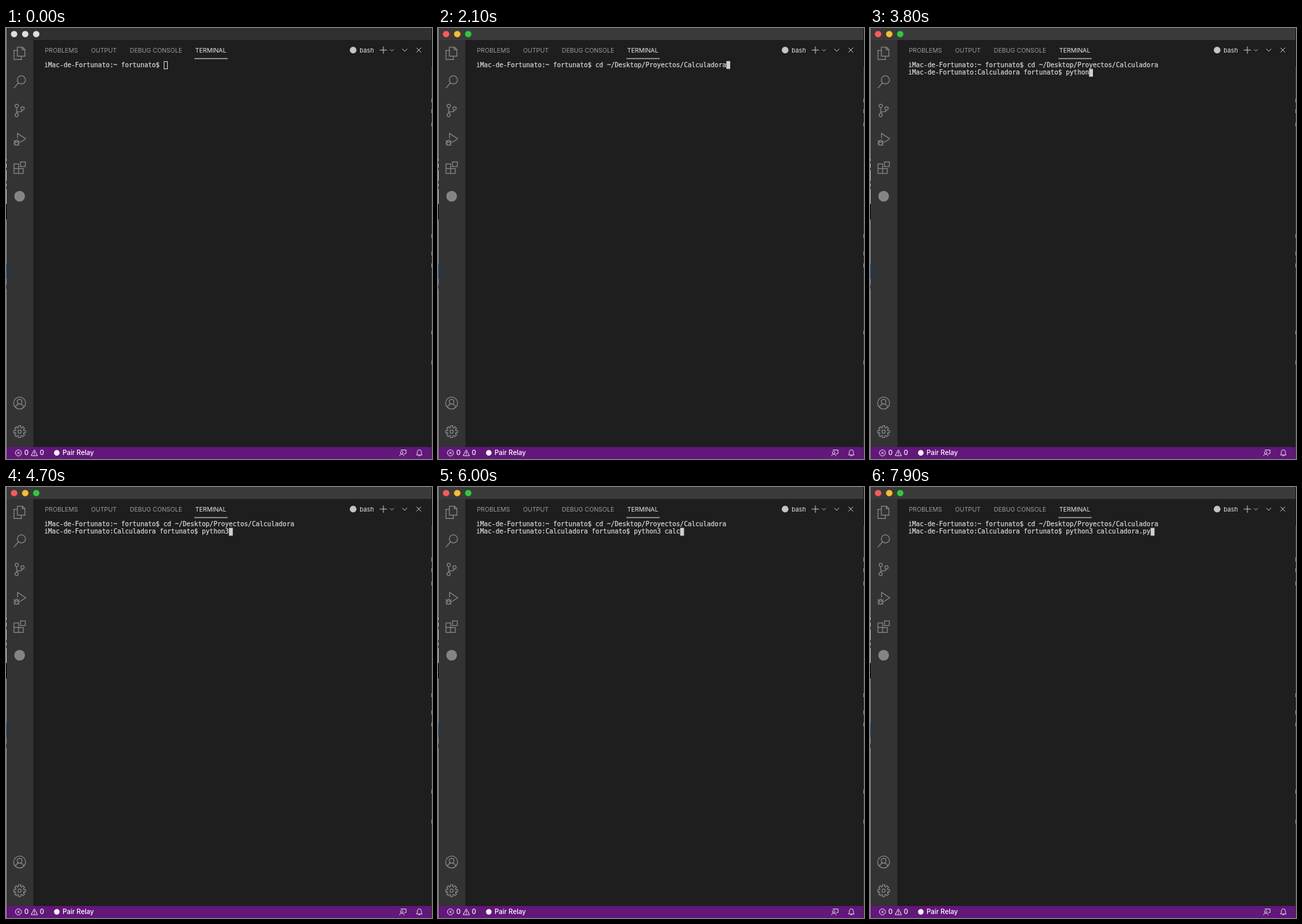
Write an HTML page with a canvas that moves like this. It is 640 px wide and 648 px high and loops after 8 s.

```html
<!DOCTYPE html>
<html lang="es">
<head>
<meta charset="utf-8">
<title>Terminal</title>
<style>
html, body { margin: 0; width: 100%; height: 100%; overflow: hidden; background: #1e1e1e; }
canvas { display: block; width: 640px; height: 648px; }
</style>
</head>
<body>
<canvas id="stage"></canvas>
<script>
const W = 640, H = 648, LOOP = 8000;
const canvas = document.getElementById('stage');
const ctx = canvas.getContext('2d');
const dpr = window.devicePixelRatio || 1;
canvas.width = W * dpr;
canvas.height = H * dpr;

const UI = 'Inter, "Open Sans", sans-serif';
const MONO = '9.6px "DejaVu Sans Mono", "Liberation Mono", monospace';
const CELL = 5.78, LINE = 11.7, LEFT = 57.5, TOP = 49.8;
const ICON = '#858585';

const PROMPT = 'iMac-de-Fortunato:';
const USER = ' fortunato$ ';
const CD = 'cd ~/Desktop/Proyectos/Calculadora';
const RUN = 'python3 calculadora.py';
const FOCUS_AT = 600, PASTE_AT = 1800, ENTER_AT = 2300;
// Moment each character of RUN is typed
const KEYS = [2900, 3200, 3350, 3500, 3650, 3800, 4300, 5000, 5400, 5600, 5750,
  5900, 6080, 6220, 6360, 6500, 6620, 6750, 6900, 7200, 7450, 7700];

function rect(x, y, w, h, color) {
  ctx.fillStyle = color;
  ctx.fillRect(x, y, w, h);
}

function disc(x, y, r, color) {
  ctx.fillStyle = color;
  ctx.beginPath();
  ctx.arc(x, y, r, 0, Math.PI * 2);
  ctx.fill();
}

function text(str, x, y, size, color, weight = 400) {
  ctx.font = `${weight} ${size}px ${UI}`;
  ctx.fillStyle = color;
  ctx.fillText(str, x, y);
}

function stroke(d, x, y, scale, color, width) {
  ctx.save();
  ctx.translate(x, y);
  ctx.scale(scale, scale);
  ctx.strokeStyle = color;
  ctx.lineWidth = width / scale;
  ctx.stroke(new Path2D(d));
  ctx.restore();
}

function ring(cx, cy, r) {
  return `M${cx + r} ${cy}a${r} ${r} 0 1 1 ${-2 * r} 0a${r} ${r} 0 1 1 ${2 * r} 0`;
}

function gear() {
  const pts = [];
  for (let i = 0; i < 8; i++) {
    const mid = i * Math.PI / 4;
    for (const [da, r] of [[-0.27, 7.7], [-0.2, 10.8], [0.2, 10.8], [0.27, 7.7]]) {
      pts.push(`${12 + r * Math.cos(mid + da)} ${12 + r * Math.sin(mid + da)}`);
    }
  }
  return 'M' + pts.join('L') + 'Z' + ring(12, 12, 3);
}

// Side bar icons on a 24 unit grid, keyed by their centre height
const sideIcons = [
  [38, 'M8 1H17.2L21.6 5.4V17.2H8ZM16.8 1V5.6H21.6M8 6.8H1.8V23.2H15.2V17.2'],
  [81, ring(15.2, 8.4, 7.4) + 'M10 13.9L1.6 23.4'],
  [124, ring(6.8, 3.7, 3) + ring(6.8, 20.2, 3) + ring(17.3, 8.2, 3) +
    'M6.8 6.7V17.2M17.2 11.2C16.6 13.5 15.5 14.2 13.5 14.2H10.5C8.5 14.2 7.2 15.5 6.9 17.2'],
  [167, 'M8.3 10.5V1.7L23 11.4L13 18' +
    'M3.4 17.5H9.8V19.5C9.8 24.4 3.4 24.4 3.4 19.5ZM4.2 17.3C4.2 12.8 9 12.8 9 17.3' +
    'M3.4 17L1.3 14.8M9.8 17L11.9 14.8M3.4 19.6H.8M9.8 19.6H12.4M3.8 21.5L1.5 23.7M9.4 21.5L11.7 23.7'],
  [210, 'M1.8 5.2H10.2V22.3H1.8ZM1.8 13.7H18.6V22.3H10.2M13.6 1.6H22.3V10.2H13.6Z'],
  [564, ring(12, 12, 10.8) + ring(12, 9.4, 4.2) + 'M4.8 20C5.5 11.6 18.5 11.6 19.2 20'],
  [607, gear()]
];

function drawTitle(focused) {
  rect(1, 0, 638, 18, focused ? '#3a3a3a' : '#303030');
  const colors = focused ? ['#fc5b57', '#fdbc2e', '#30c840'] : ['#dedede', '#dedede', '#dedede'];
  [12.2, 28.9, 45.4].forEach((x, i) => disc(x, 9.2, 4.8, colors[i]));
}

function drawEdges() {
  rect(0, 0, 1, H, '#8c8c8c');
  rect(0, 196, 1, 68, '#c4c4c4');
  for (const y of [200, 210, 230, 238]) rect(0, y, 1, 4, '#555');
  rect(0, 265, 1, 23, '#000');
  rect(0, 355, 1, 22, '#1f70b8');
  rect(0, 386, 1, 6, '#444');
  rect(639, 0, 1, H, '#343434');
  rect(639, 0, 1, 58, '#171717');
  for (const y of [106, 122, 142, 310, 336, 354, 455, 500]) rect(639, y, 1, 6, '#8f8f8f');
}

function drawPanel() {
  const tabs = [['PROBLEMS', 58.5], ['OUTPUT', 127.8], ['DEBUG CONSOLE', 186], ['TERMINAL', 284.3]];
  tabs.forEach(([name, x], i) => text(name, x, 36.7, 9.2, i === 3 ? '#e7e7e7' : '#999'));
  rect(283, 45.5, 50, 1, '#e7e7e7');

  disc(521.5, 33.3, 5, '#c5c5c5');
  text('bash', 531.3, 36.7, 9.3, '#e0e0e0');
  stroke('M561.5 33.2H572.5M567 27.7V38.7', 0, 0, 1, '#c5c5c5', 1);
  stroke('M577 32L579.7 34.7L582.4 32', 0, 0, 1, '#c5c5c5', 0.9);
  stroke('M595.3 31.4L599 35.1L602.7 31.4', 0, 0, 1, '#c5c5c5', 1);
  stroke('M616.7 29.7L623.7 36.7M623.7 29.7L616.7 36.7', 0, 0, 1, '#c5c5c5', 1);
}

function drawSideBar() {
  rect(1, 18, 40, 612, '#333');
  for (const [y, d] of sideIcons) stroke(d, 10.5, y - 10, 0.83, ICON, 1.25);
  disc(20.5, 253, 8, ICON);
}

function drawStatus() {
  rect(1, 630, 638, 18, '#62177a');
  const line = (d, w = 0.9) => stroke(d, 0, 0, 1, '#f2f2f2', w);
  line(ring(18.7, 638.8, 4.6) + 'M16.8 636.9L20.6 640.7M20.6 636.9L16.8 640.7');
  text('0', 27.6, 642.3, 10, '#fff', 500);
  line('M42.5 634.2L47.3 643H37.7ZM42.5 637V640.2M42.5 641V642');
  text('0', 50.8, 642.3, 10, '#fff', 500);
  disc(76.3, 638.8, 4.2, '#f2f2f2');
  text('Pair Relay', 85, 642.3, 10, '#fff', 500);
  line(ring(594.5, 638.6, 1.9) + 'M591.3 643.6C591.3 639.8 597.7 639.8 597.7 643.6' +
    'M593 634.5H601V639.7H599.6L598 641.2');
  line('M616.8 642H625.2L624 639.8V637.5C624 633.2 618 633.2 618 637.5V639.8ZM619.8 642.2C620 644 622 644 622.2 642.2');
}

function mono(str, row) {
  const y = TOP + 8.9 + row * LINE;
  ctx.font = MONO;
  ctx.fillStyle = ctx.strokeStyle = '#dcdcdc';
  ctx.lineWidth = 0.2;
  ctx.fillText(str, LEFT, y);
  ctx.strokeText(str, LEFT, y);
}

function drawTerminal(t, focused) {
  const lines = [PROMPT + '~' + USER + (t >= PASTE_AT ? CD : '')];
  if (t >= ENTER_AT) {
    const typed = KEYS.filter(k => k <= t).length;
    lines.push(PROMPT + 'Calculadora' + USER + RUN.slice(0, typed));
  }
  lines.forEach(mono);

  const row = lines.length - 1;
  const x = LEFT + lines[row].length * CELL;
  const y = TOP + row * LINE;
  if (focused) {
    rect(x, y, CELL, LINE, '#cfcfcf');
  } else {
    ctx.strokeStyle = '#cfcfcf';
    ctx.lineWidth = 1;
    ctx.strokeRect(Math.round(x) + 0.5, Math.round(y) + 0.5, 5, 11);
  }
}

function draw(now) {
  const t = now % LOOP;
  const focused = t >= FOCUS_AT;
  ctx.setTransform(dpr, 0, 0, dpr, 0, 0);
  rect(0, 0, W, H, '#1e1e1e');
  drawTitle(focused);
  drawSideBar();
  drawPanel();
  drawStatus();
  drawTerminal(t, focused);
  drawEdges();
}

let start;
function tick(now) {
  if (start === undefined) start = now;
  draw(now - start);
  requestAnimationFrame(tick);
}
draw(0);
requestAnimationFrame(tick);
</script>
</body>
</html>
```
